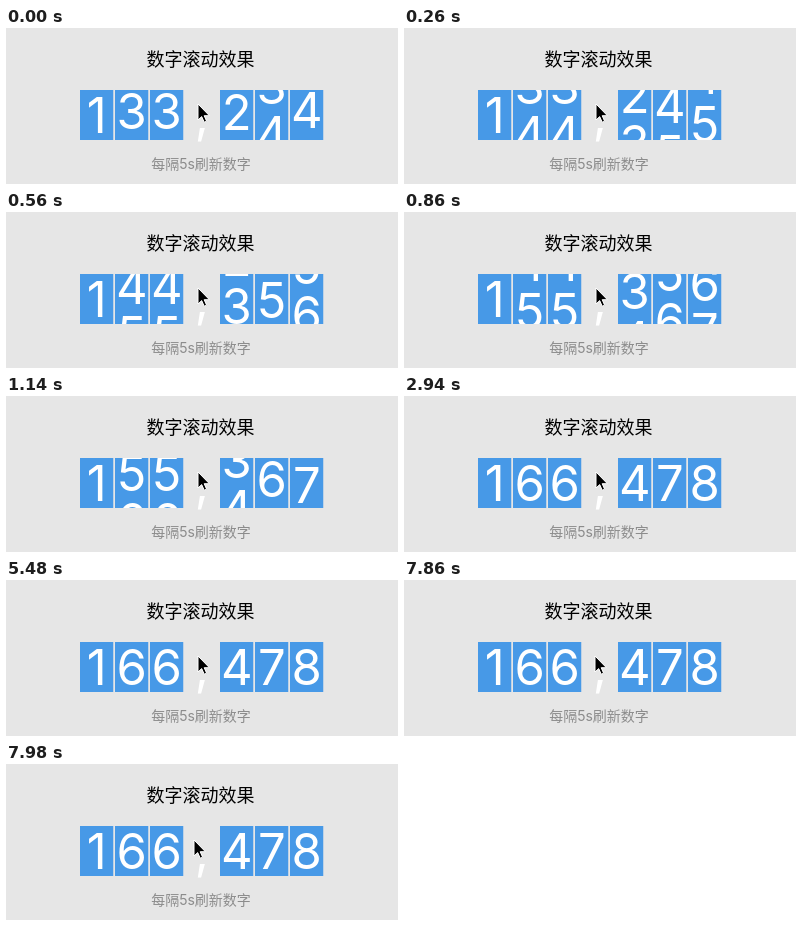
These frames come from a looping animation (392x156 px, 8 s). An HTML page:

```html
<!DOCTYPE html>
<html lang="zh-CN">
<head>
<meta charset="utf-8">
<title>数字滚动效果</title>
<style>
  @property --u { syntax: "<number>"; inherits: true; initial-value: 1; }

  html, body { margin: 0; width: 100%; height: 100%; overflow: hidden; background: #e6e6e6; }
  svg { display: block; }
  text { text-anchor: middle; font-family: Inter, "Noto Sans CJK SC", "Noto Sans CJK", sans-serif; }

  #stage { animation: roll 8s linear infinite; }
  .title { font-size: 18px; font-weight: 500; fill: #000; }
  .note { font-size: 14px; fill: #8c8c8c; }
  .digit { font-size: 49px; fill: #fff; }
  .strip { transform: translateY(calc(var(--u) * var(--n) * -48px)); }
  .cursor { animation: nudge 8s step-end infinite; }

  /* Share of the way from 0 to each final digit, with short stalls */
  @keyframes roll {
    0%, .25% { --u: .514; }
    7%, 8.49% { --u: .712; }
    8.5% { --u: .725; }
    10.75%, 11.99% { --u: .792; }
    12% { --u: .806; }
    17.75%, 19.24% { --u: .966; }
    19.25% { --u: .976; }
    19.5%, 20.74% { --u: .983; }
    20.75% { --u: .993; }
    21.25%, 100% { --u: 1; }
  }
  @keyframes nudge {
    0% { transform: translateX(0); }
    98.25% { transform: translateX(-1px); }
    99% { transform: translateX(-3px); }
    99.75%, 100% { transform: translateX(-4px); }
  }
</style>
</head>
<body>
<svg id="stage" width="392" height="156" viewBox="0 0 392 156">
  <text class="title" x="194.5" y="38">数字滚动效果</text>
  <g id="counter"></g>
  <text class="note" x="195" y="141">每隔5s刷新数字</text>
  <path class="cursor" d="M192 76v16l3.7-3.4 2.5 5.6 2.4-1-2.4-5.5h5.2z"
        fill="#000" stroke="#fff" stroke-linejoin="round"/>
</svg>
<script>
  const PITCH = 35, CELL = 33.5, HEIGHT = 50, ROW = 48, BASE = 43;
  const counter = document.getElementById("counter");

  function add(parent, tag, attrs, text = "") {
    const el = document.createElementNS("http://www.w3.org/2000/svg", tag);
    for (const key in attrs) el.setAttribute(key, attrs[key]);
    el.textContent = text;
    return parent.appendChild(el);
  }

  function glyph(parent, char, row = 0) {
    add(parent, "text", { class: "digit", x: CELL / 2, y: BASE + row * ROW }, char);
  }

  [..."166,478"].forEach((char, i) => {
    const cell = add(counter, "svg", {
      x: 74 + i * PITCH, y: 62, width: CELL, height: HEIGHT + (char === "," ? 6 : 0)
    });
    if (char === ",") return glyph(cell, char);

    add(cell, "rect", { width: CELL, height: HEIGHT, fill: "#4799e7" });
    if (i === 0) return glyph(cell, char);

    const strip = add(cell, "g", { class: "strip", style: `--n: ${char}` });
    for (let d = 0; d < 10; d++) glyph(strip, d, d);
  });
</script>
</body>
</html>
```
